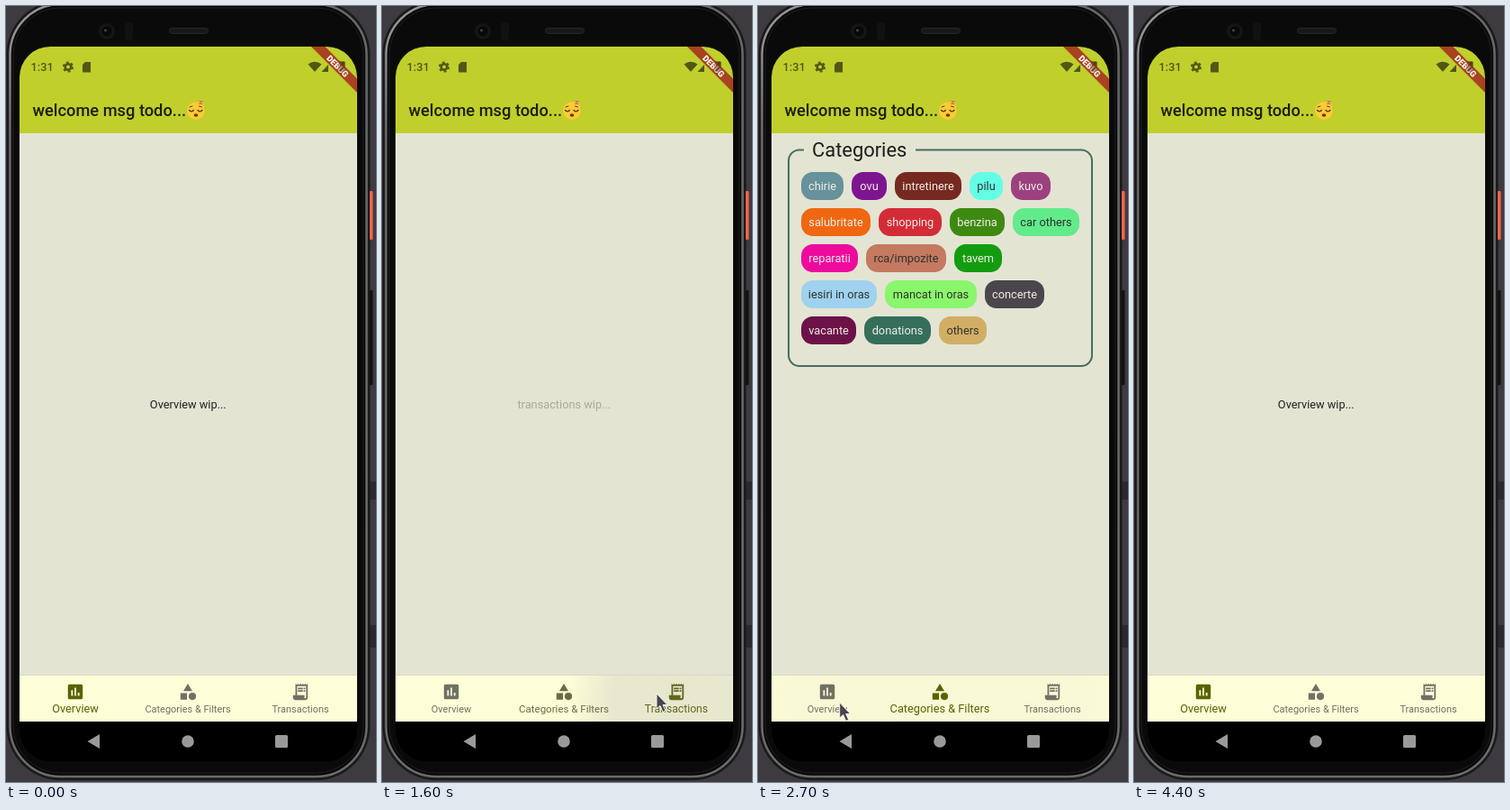
Recreate the animation shown at these times as an HTML page. Size 411 by 860 pixels, loop 4.7 s.

```html
<!DOCTYPE html>
<html lang="en">
<head>
<meta charset="utf-8">
<title>Budget app walkthrough</title>
<style>
  html, body { margin: 0; width: 100%; height: 100%; overflow: hidden; background: #3e3b40; }
  svg { display: block; width: 411px; height: 860px; font-family: Roboto, Arial, sans-serif; }
  .mid { text-anchor: middle; }
  .body { font-size: 12.78px; }
</style>
</head>
<body>
<svg viewBox="0 0 411 860">
  <defs>
    <clipPath id="screen"><rect x="15" y="45" width="375" height="792" rx="34"/></clipPath>
    <clipPath id="bar"><rect x="15" y="742" width="375" height="51"/></clipPath>
    <radialGradient id="soft">
      <stop offset=".6" stop-color="#5a5a90"/>
      <stop offset="1" stop-color="#5a5a90" stop-opacity="0"/>
    </radialGradient>
    <linearGradient id="rim" x2=".4" y2="1">
      <stop stop-color="#a0a0a0"/>
      <stop offset=".15" stop-color="#686868"/>
      <stop offset="1" stop-color="#6c6c6c"/>
    </linearGradient>
  </defs>

  <!-- phone body -->
  <rect x="404" y="527" width="7" height="20" fill="#2b292d"/>
  <rect x="404" y="686" width="7" height="25" fill="#2b292d"/>
  <rect x=".5" y="-6" width="404" height="864" rx="60" fill="#1a1a1b"/>
  <rect x="4.500" y="-2" width="396" height="856" rx="56" fill="#080808" stroke="url(#rim)" stroke-width="2.500"/>
  <rect x="8" y="2" width="389" height="848" rx="52" fill="#0a0a0a" stroke="#202020"/>
  <rect x="404" y="205" width="3.500" height="54" rx="1" fill="#f0644f"/>
  <rect x="404" y="315" width="3.500" height="105" rx="1" fill="#121212"/>
  <circle cx="112" cy="28" r="9" fill="#151516"/>
  <circle cx="112" cy="28" r="5.500" fill="#08080a"/>
  <circle cx="110.500" cy="27" r="1.500" fill="#43454e"/>
  <rect x="132" y="18" width="9" height="20" rx="4" fill="#111"/>
  <rect x="181.500" y="24.500" width="43" height="6" rx="3" fill="#181818" stroke="#252525"/>

  <g clip-path="url(#screen)">
    <rect x="15" y="45" width="375" height="792"/>
    <rect x="15" y="45" width="375" height="96" fill="#c1cf2c"/>
    <rect x="15" y="141" width="375" height="601" fill="#e4e4d3"/>

    <!-- status icons -->
    <g fill="#505717">
      <text x="27.500" y="72" font-size="12.780" font-weight="500">1:31</text>
      <circle cx="69" cy="67.500" r="3.300" fill="none" stroke="#505717" stroke-width="2.600"/>
      <circle cx="69" cy="67.500" r="5.200" fill="none" stroke="#505717" stroke-width="1.800" stroke-dasharray="2.700 2.745"/>
      <path d="M88 62h6v11.500h-9v-8.500z"/>
      <path d="M335.500 64.500q7.500-5.500 15 0l-7.500 8.500zM358 65v8h-7.500z"/>
      <rect x="369.500" y="61.500" width="7" height="11.500" rx="1"/>
    </g>
    <text x="29.500" y="121.500" font-size="18.260" font-weight="500" fill="#1d1f0b">welcome msg todo...</text>

    <!-- sleeping face -->
    <circle cx="211" cy="116" r="9.800" fill="#fdcb35"/>
    <g fill="none" stroke="#5d3c1c" stroke-width="1.400" stroke-linecap="round">
      <path d="M203.500 115.500q2.500 2.500 5 0M213 115.500q2.500 2.500 5 0"/>
      <path d="M204 112l3-1M217.500 112l-3-1" stroke-width="1"/>
      <path d="M215 105.500h3l-3 3h3" stroke="#e56a72" stroke-width="1.200"/>
    </g>
    <ellipse cx="211" cy="121" rx="2.400" ry="1.800" fill="#6b3d20"/>

    <!-- debug ribbon, the battery shows through -->
    <path d="M339 45h15.500L390 80.500V96z" fill="#a8431f"/>
    <text class="mid" transform="translate(368.400 66.600) rotate(45)" y="3.400" font-size="9.400" font-weight="900" fill="#fff">DEBUG</text>
    <rect x="369.500" y="61.500" width="7" height="11.500" rx="1" fill="#4a2a10" opacity=".4"/>

    <!-- pages -->
    <g class="page"><text class="mid body" x="202.300" y="446" fill="#222">Overview wip...</text></g>
    <g class="page" id="cats">
      <path d="M51 159.500H46a12 12 0 0 0-12 12V387a12 12 0 0 0 12 12H359a12 12 0 0 0 12-12V171.500a12 12 0 0 0-12-12H175" fill="none" stroke="#46705f" stroke-width="2"/>
      <text x="60" y="166.500" font-size="21.900" fill="#1e1e1b">Categories</text>
    </g>
    <g class="page"><text class="mid body" x="202.300" y="446" fill="#222">transactions wip...</text></g>

    <!-- bottom bar -->
    <rect x="15" y="741" width="375" height="52" fill="#fdfdd8"/>
    <rect x="15" y="741" width="375" height="1" fill="#d9d9c3"/>
    <g clip-path="url(#bar)"><circle id="ripple" cy="767" fill="url(#soft)"/></g>
    <g id="tabs"></g>
    <g fill="#9a9a9a">
      <path d="M90.500 815l13.500-8v16z"/>
      <circle cx="202" cy="815" r="6.800"/>
      <rect x="299" y="808" width="14" height="14" rx="1.500"/>
    </g>
  </g>
  <path id="cursor" d="M0 0V17L4 13.500 7 20.500 10 19 7 12.500H12Z" fill="#47444c" stroke="#f4f4f4"/>
</svg>

<script>
const LOOP = 4700, STEP = 100;
const $ = id => document.getElementById(id);
const clamp = v => Math.max(0, Math.min(1, v));
const mix = (a, b, k) => a + (b - a) * k;

function add(parent, tag, attrs, text = '') {
  const el = document.createElementNS('http://www.w3.org/2000/svg', tag);
  for (const key in attrs) el.setAttribute(key, attrs[key]);
  el.textContent = text;
  return parent.appendChild(el);
}

// label, width, colour, and 1 for dark text
const chipRows = [
  [['chirie', 47, '#67919b'], ['ovu', 39, '#7d1590'], ['intretinere', 74, '#752921'], ['pilu', 37, '#64fde6', 1], ['kuvo', 44, '#9c4180']],
  [['salubritate', 77, '#f06712'], ['shopping', 70, '#d32c37'], ['benzina', 61, '#3e8a10'], ['car others', 74, '#62eb8b', 1]],
  [['reparatii', 63, '#ee0a9d'], ['rca/impozite', 89, '#c47960', 1], ['tavem', 53, '#139c10']],
  [['iesiri in oras', 84, '#9fd2ef', 1], ['mancat in oras', 102, '#8af66c', 1], ['concerte', 66, '#4a464b']],
  [['vacante', 61, '#6c1248'], ['donations', 74, '#356f5c'], ['others', 53, '#d2ae65', 1]]
];
chipRows.forEach((row, r) => {
  let x = 48;
  const y = 184 + r * 40;
  for (const [label, width, fill, dark] of row) {
    add($('cats'), 'rect', { x, y, width, height: 31, rx: 13, fill });
    add($('cats'), 'text', { class: 'mid body', x: x + width / 2, y: y + 20, fill: dark ? '#30322e' : '#f0eee6' }, label);
    x += width + 9;
  }
});

const tabs = [
  ['Overview', 77, 'M19 3H5c-1.100 0-2 .9-2 2v14c0 1.100.9 2 2 2h14c1.100 0 2-.9 2-2V5c0-1.100-.9-2-2-2zM9 17H7v-7h2v7zm4 0h-2V7h2v10zm4 0h-2v-4h2v4z'],
  ['Categories & Filters', 202, 'M12 2l-5.500 9h11zM3 13.500h8v8H3zM13 17.500a4.500 4.500 0 1 0 9 0a4.500 4.500 0 1 0-9 0z'],
  ['Transactions', 327, 'M19.500 3.500L18 2l-1.500 1.500L15 2l-1.500 1.500L12 2l-1.500 1.500L9 2 7.500 3.500 6 2v14H3v3c0 1.660 1.340 3 3 3h12c1.660 0 3-1.340 3-3V2zM19 19c0 .55-.45 1-1 1s-1-.45-1-1v-3H8V5h11zM9 7h6v2H9zM16 7h2v2h-2zM9 10h6v2H9zM16 10h2v2h-2z']
].map(([label, x, d]) => {
  const g = add($('tabs'), 'g', {});
  add(g, 'path', { d, transform: `translate(${x - 10.95} 749.1) scale(.9125)` });
  return { x, g, text: add(g, 'text', { class: 'mid', 'font-size': 10.96 }, label) };
});
const pages = document.querySelectorAll('.page');

// page switch time, ripple start, page shown
const taps = [[-1000, -1000, 0], [800, 800, 1], [1500, 1400, 2], [2260, 2260, 1], [3100, 3000, 0]];

// pointer paths: time, x, y
const paths = [
  [[300, 215, 838], [400, 211, 819], [500, 206, 796], [600, 203, 781], [900, 203, 781], [1000, 240, 774],
   [1100, 284, 765], [1200, 302, 768], [1400, 308, 776], [1600, 305, 762], [1900, 305, 762], [2000, 235, 776],
   [2100, 157, 774], [2300, 150, 775], [2400, 127, 776], [2600, 92, 772], [2900, 88, 772], [3200, 83, 810]],
  [[4200, 13, 58], [4300, 7, 24]]
];

function pointerAt(t) {
  for (const path of paths)
    for (let i = 1; i < path.length; i++) {
      const [t0, x0, y0] = path[i - 1], [t1, x1, y1] = path[i];
      if (t < t0 || t > t1) continue;
      const k = (t - t0) / (t1 - t0);
      return [mix(x0, x1, k), mix(y0, y1, k)];
    }
}

function draw(t) {
  const now = taps.findLastIndex(tap => tap[0] <= t);
  const [start, , page] = taps[now];
  const from = now ? taps[now - 1][2] : page;
  const dt = t - start;

  pages.forEach((el, i) => el.setAttribute('opacity', i === page ? clamp((dt - 40) / 200) : 0));

  const k = clamp(dt / 160), ease = k * k * (3 - 2 * k);
  tabs.forEach(({ x, g, text }, i) => {
    const on = i === page ? ease : i === from ? 1 - ease : 0;
    const [r, gr, b] = [[112, 88], [113, 99], [100, 0]].map(([a, z]) => mix(a, z, on));
    g.setAttribute('fill', `rgb(${r},${gr},${b})`);
    text.setAttribute('transform', `translate(${x} 783) scale(${mix(1, 14 / 12, on)})`);
  });

  const [, began, target] = taps.findLast(tap => tap[1] <= t);
  const age = t - began;
  $('ripple').setAttribute('cx', tabs[target].x);
  $('ripple').setAttribute('r', Math.min(age, 500) * .6);
  $('ripple').setAttribute('opacity', .13 * clamp((500 - age) / 300));

  const tip = pointerAt(t);
  $('cursor').setAttribute('visibility', tip ? 'visible' : 'hidden');
  if (tip) $('cursor').setAttribute('transform', `translate(${tip})`);
}

function tick() {
  draw(Math.floor(performance.now() % LOOP / STEP) * STEP);
  requestAnimationFrame(tick);
}
tick();
</script>
</body>
</html>
```
